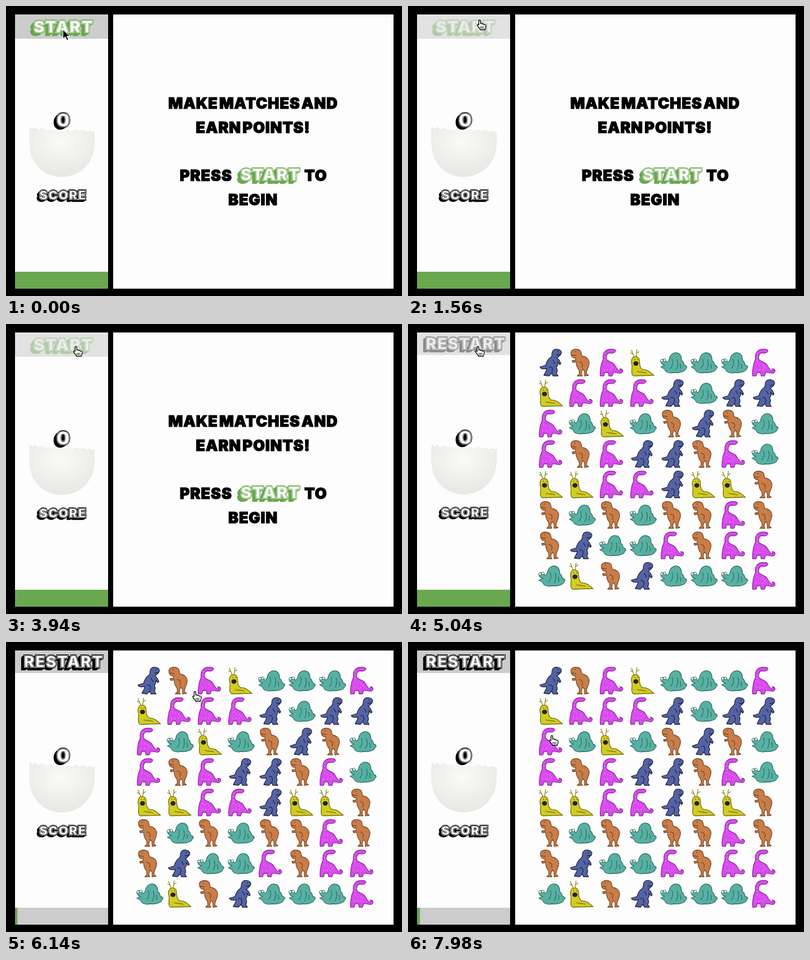
Recreate the animation shown at these times as an HTML page. Size 702x514 px, loop 8000 ms.

```html
<!DOCTYPE html>
<html lang="en">
<head>
<meta charset="utf-8">
<title>Dino match</title>
<style>
html, body { margin: 0; width: 100%; height: 100%; overflow: hidden; background: #000; }
svg { display: block; }
text { font-family: Inter, Roboto, sans-serif; font-weight: 900; text-anchor: middle; }
.plain text { font-size: 27px; letter-spacing: .9px; word-spacing: -4px; stroke: #000; stroke-width: 1.2; }
.plain .left { text-anchor: start; }
.shaded { letter-spacing: 1.5px; stroke-linejoin: miter; }
.sprite path { stroke-width: 1.3; stroke-linejoin: round; }
</style>
</head>
<body>
<svg id="stage" width="702" height="514" viewBox="0 0 702 514"></svg>
<script>
const LOOP = 8000, GAME_START = 5020;
const GREEN = '#6aa84f', GREY = '#cccccc', WHITE = '#fdfdfd';

const sprites = {
  P: `<path fill="#d94bee" stroke="#8d2d9c" d="M30 5C30 2 24 1 18 2C9 4 7 12 8 19C7 24 4 27 4 32C3 38 2 43 3 49H9L11 43H17L18 49H24L26 43C32 42 36 45 40 44C45 41 42 35 37 37C39 38 40 40 37 40C33 39 31 33 28 29C24 24 17 24 14 20C13 14 14 9 19 8C23 9 28 9 30 5Z"/>
      <path fill="none" stroke="#f6c4ff" stroke-width="1.8" stroke-linecap="round" stroke-dasharray="0 6" d="M11 9L11 28L25 32L24 38L8 38"/>`,
  O: `<path fill="#c97d48" stroke="#7c4a27" d="M5 6C9 0 18 1 22 5C24 9 23 12 25 14C33 15 38 21 37 27C37 32 34 36 33 40L32 45 36 48 29 49 29 41 26 37 24 41 23 45 25 49H16L20 45 19 38C15 34 14 29 14 24L8 25 7 22 13 21 13 17C8 18 4 14 5 6Z"/>
      <path fill="none" stroke="#7c4a27" d="M6 12L14 13M11 6h2M19 24C24 23 27 28 24 34"/>`,
  N: `<path fill="#5463a6" stroke="#23263c" d="M42 7C40 1 29-1 26 6C24 9 27 13 23 16C17 20 15 26 14 30L4 33C5 37 11 37 16 36C16 41 12 44 11 48L20 49 25 44 27 49H36L33 44C35 41 35 37 33 34C36 30 36 26 35 24L39 29 41 27 38 21 34 17C37 15 42 12 42 7Z"/>
      <path fill="none" stroke="#23263c" d="M41 11L33 12M35 6h2M27 21L31 28M20 34C25 31 28 37 25 43"/>`,
  Y: `<path fill="none" stroke="#8b8417" stroke-width="2" d="M10 18L4 3M7 10L2 8M12 17L14 2M13 9L18 6"/>
      <path fill="#d2cc22" stroke="#77700e" d="M6 17C10 13 17 15 18 20C19 28 18 34 24 38C32 37 38 43 44 48L8 49C2 46 6 36 5 30C3 24 4 20 6 17Z"/>
      <ellipse cx="12" cy="27" rx="4.5" ry="4" fill="#25230c"/>
      <path fill="none" stroke="#77700e" d="M9 20h2M14 20h2M14 41C20 43 26 42 31 44"/>`,
  T: `<path fill="#57b1a3" stroke="#356f66" d="M2 22C4 19 8 19 11 22C13 26 15 25 17 20C18 12 24 7 30 8C37 9 39 15 39 22C43 23 43 29 44 30C49 31 49 35 46 36C46 42 32 44 26 43C18 45 10 43 9 37L2 33 9 30C5 29 2 26 2 22Z"/>
      <path fill="none" stroke="#356f66" d="M19 36C24 31 24 24 22 19M29 38C33 32 33 26 31 20M37 36C38 32 38 30 36 27"/>
      <circle cx="4" cy="22" r="2.3" fill="#fff" stroke="#356f66"/><circle cx="9" cy="21" r="2.3" fill="#fff" stroke="#356f66"/>`
};
const board = ['NOPYTTTP', 'YPPPNTNN', 'PTYTONOT', 'POPNNOPT',
               'YYPPNYYO', 'OTOTOOPO', 'ONTTPOPP', 'TYONTTTP'];

// Inline block lettering with an extruded shade to the lower left.
function shaded(label, x, y, size, depth, color) {
  const layer = (dx, dy, stroke, width, fill) =>
    `<text x="${x - dx}" y="${y + dy}" stroke="${stroke}" stroke-width="${width}" fill="${fill}">${label}</text>`;
  let out = '';
  for (let d = depth; d > 0; d--) out += layer(d, d * .8, color, 2.4, color);
  out += layer(0, 0, color, 4, color) + layer(0, 0, WHITE, 2.2, WHITE) + layer(0, 0, color, .8, WHITE);
  return `<g class="shaded" font-size="${size}">${out}</g>`;
}

const tiles = board.map((row, j) => [...row].map((kind, i) =>
  `<use href="#${kind}" x="${230 + 54 * i}" y="${43 + 54 * j}"/>`).join('')).join('');

const stage = document.getElementById('stage');
stage.innerHTML = `
  <defs>
    ${Object.entries(sprites).map(([id, art]) => `<g id="${id}" class="sprite">${art}</g>`).join('')}
    <radialGradient id="shell" cx=".48" cy=".3" r=".62">
      <stop offset="0" stop-color="#fafaf8"/><stop offset="1" stop-color="#e9e9e5"/>
    </radialGradient>
  </defs>
  <rect width="702" height="514"/>
  <path fill="${WHITE}" d="M16 15h165v486h-165zM190 15h497v486h-497z"/>
  <rect id="button" x="16" y="15" width="165"/>
  <g id="startLabel">${shaded('START', 102, 47, 29, 6, GREEN)}</g>
  <g id="restartLabel">${shaded('RESTART', 102.5, 45, 28, 5, '#000')}</g>
  <g id="score">
    <path fill="url(#shell)" d="M42 214l5 4 4-4 6 5 7-3 6 4 8-2 7 3 9-2 8 3 7-3 8 3 7-4 7 4 6-3 5 4 6-2 6 2 3-1C158 248 157 263 148 276C137 294 118 303 99 303C79 303 61 294 50 276C41 262 40 242 42 214Z"/>
    ${shaded('0', 102, 214, 33, 5, '#000')}
    ${shaded('SCORE', 101, 343, 22, 4, '#000')}
  </g>
  <rect x="16" y="471" width="165" height="30" fill="${GREY}"/>
  <rect id="bar" x="16" y="471" height="30" fill="${GREEN}"/>
  <g id="intro">
    <g class="plain">
      <text x="438" y="182">MAKE MATCHES AND</text>
      <text x="438" y="225">EARN POINTS!</text>
      <text class="left" x="308" y="310">PRESS</text>
      <text class="left" x="529" y="310">TO</text>
      <text x="438" y="353">BEGIN</text>
    </g>
    ${shaded('START', 469, 309, 29, 6, GREEN)}
  </g>
  <g id="tiles">${tiles}</g>
  <g id="cursor">
    <path id="arrow" d="M0 0V16L4 12.5 7 19 9.500 18 7 11.500H12Z" fill="#000" stroke="#fff"/>
    <g id="hand">
      <path d="M-1.500 1C-1.500-.5 1.500-.5 1.500 1V6C3 5 4.500 5.500 4.500 7C6 6 7.500 6.500 7.500 8C9.500 7.500 11 8.500 11 10V12C11 14 9.500 15 9.500 17H1C0 14-3 12-4 9.500C-4.500 8-2.500 7-1.500 9Z" fill="#fff" stroke="#000" stroke-width="1.3"/>
      <path d="M2 11v4M4.500 11v4M7 11v4" stroke="#000"/>
    </g>
  </g>`;

const part = id => document.getElementById(id);
const show = (id, on) => part(id).style.display = on ? '' : 'none';
const clamp = v => Math.min(1, Math.max(0, v));
const ease = v => (v = clamp(v), v * v * (3 - 2 * v));
const mix = (a, b, k) => a + (b - a) * k;

// Pointer tip: time, x, y.
const path = [[20, 101, 42], [1400, 127, 25], [1700, 127, 25], [2500, 130, 38], [2700, 130, 38],
              [3450, 122, 14], [3900, 124, 40], [5100, 124, 40], [6100, 335, 88], [6250, 335, 88],
              [7900, 255, 166], [8000, 255, 166]];

function pointer(t) {
  const n = path.findIndex(p => p[0] > t);
  if (n < 1) return path[0].slice(1);
  const [t0, x0, y0] = path[n - 1], [t1, x1, y1] = path[n];
  const k = ease((t - t0) / (t1 - t0));
  return [mix(x0, x1, k), mix(y0, y1, k)];
}

function barWidth(t) {
  if (t < GAME_START) return 165;
  const progress = 3.6 + (t - GAME_START) * .00055;
  return mix(165, progress, ease((t - GAME_START - 80) / 600));
}

function draw(t) {
  const playing = t >= GAME_START;
  const [x, y] = pointer(t);
  const hover = ease((t - 20) / 150) * (1 - ease((t - 5480) / 150));
  const shade = Math.round(mix(204, 226, hover));

  part('button').setAttribute('height', playing ? 40 : 43);
  part('button').setAttribute('fill', `rgb(${shade},${shade},${shade})`);
  part('startLabel').style.opacity = part('restartLabel').style.opacity = mix(1, .38, hover);
  show('startLabel', !playing);
  show('restartLabel', playing);
  show('intro', !playing);
  show('tiles', playing);
  part('score').setAttribute('transform', `translate(0 ${playing ? -1 : 0})`);
  part('bar').setAttribute('width', barWidth(t));

  const clickable = t >= 20 && (x < 181 || x > 228);
  show('hand', clickable);
  show('arrow', !clickable);
  part('cursor').setAttribute('transform', `translate(${Math.round(x)} ${Math.round(y)})`);
}

function frame() {
  draw(performance.now() % LOOP);
  requestAnimationFrame(frame);
}
frame();
</script>
</body>
</html>
```
